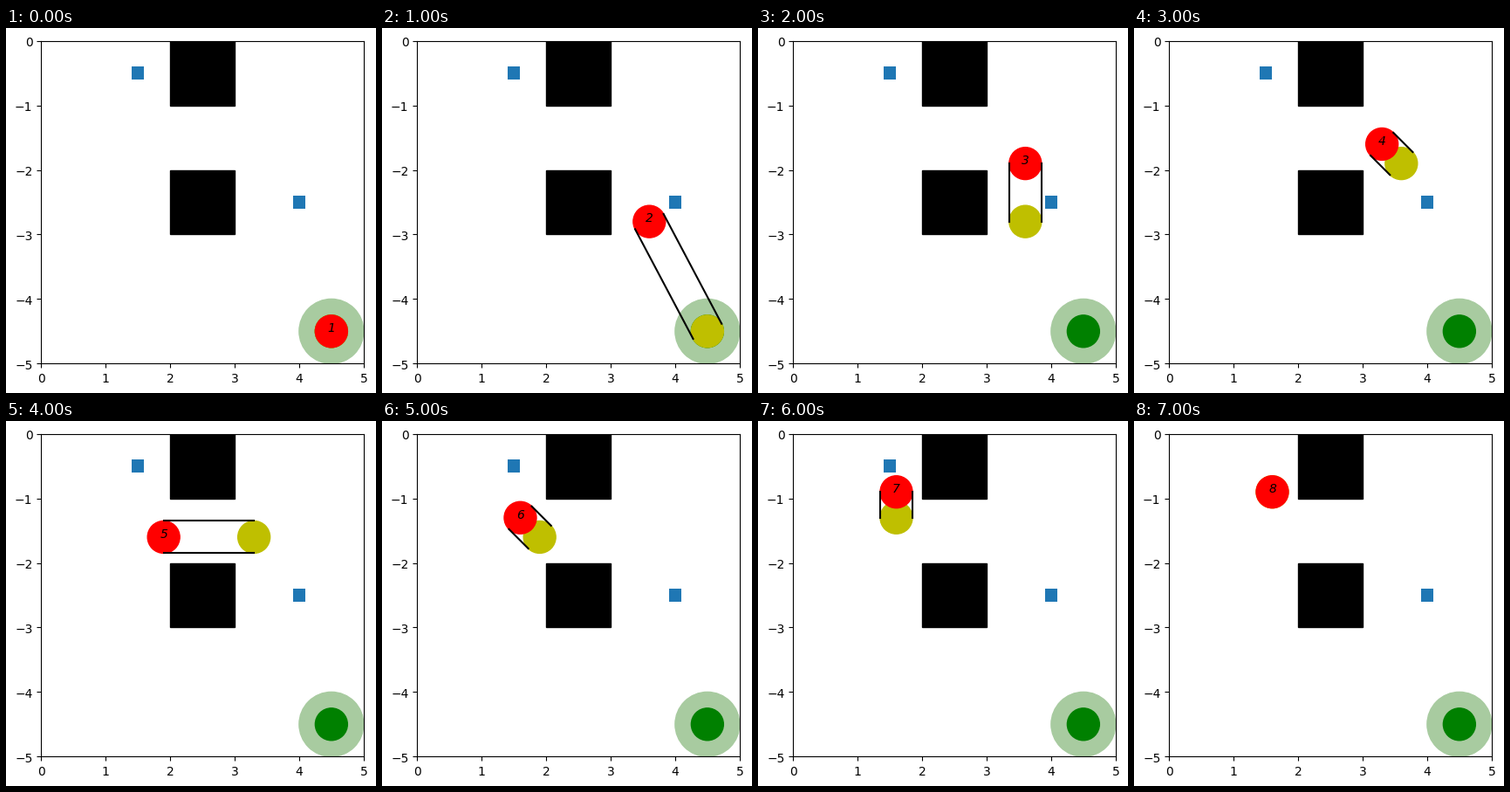
These frames come from a looping animation (424x418 px, 8 s). A matplotlib script:

```python
import numpy as np
import matplotlib.pyplot as plt
from matplotlib.animation import FuncAnimation
from matplotlib.patches import Circle, Rectangle
from matplotlib.transforms import ScaledTranslation

W, H, DPI = 424, 418, 100
LEFT, TOP, SIDE = 40.22, 14.68, 369.6  # plot area in pixels
TEXT_DROP = 0.8  # all text sits this many pixels lower than its anchor
R = 0.25
HOME = (4.5, -4.5)
PICKUP_STEP = 7

# Robot position at each step; the robot waits at its last place to pick up.
STOPS = np.array([HOME, (3.6, -2.8), (3.6, -1.9), (3.3, -1.6),
                  (1.9, -1.6), (1.6, -1.3), (1.6, -0.9), (1.6, -0.9)])

fig = plt.figure(figsize=(W / DPI, H / DPI), dpi=DPI, facecolor="white")
ax = fig.add_axes([LEFT / W, 1 - (TOP + SIDE) / H, SIDE / W, SIDE / H])
ax.set(xlim=(0, 5), ylim=(-5, 0), xticks=range(6), yticks=range(-5, 1))


def disc(center, radius, color):
    return ax.add_patch(Circle(center, radius, color=color))


def box(x, y, size, color, lw):
    return ax.add_patch(Rectangle((x, y), size, size, color=color, lw=lw))


box(2, -1, 1, "black", 1)
box(2, -3, 1, "black", 1)
item = box(1.4, -0.6, 0.2, "tab:blue", 0)
box(3.9, -2.6, 0.2, "tab:blue", 0)
disc(HOME, 0.5, "#a8cba0")
disc(HOME, R, "g")
previous = disc(HOME, R, "y")
robot = disc(HOME, R, "red")
rails = [ax.plot([], [], color="black", lw=1.5)[0] for _ in range(2)]
label = ax.text(*HOME, "", style="italic", ha="center", fontsize=10)

drop = ScaledTranslation(0, -TEXT_DROP / DPI, fig.dpi_scale_trans)
for text in [label, *ax.get_xticklabels(), *ax.get_yticklabels()]:
    text.set_transform(text.get_transform() + drop)


def update(step):
    start, end = STOPS[max(step - 1, 0)], STOPS[step]
    previous.center = start
    robot.center = end
    label.set_position(end)
    label.set_text(str(step + 1))
    item.set_visible(step < PICKUP_STEP)

    dx, dy = end - start
    length = np.hypot(dx, dy)
    for rail, side in zip(rails, (1, -1)):
        rail.set_visible(length > 0)
        if length > 0:
            offset = side * R * np.array([-dy, dx]) / length
            rail.set_data(*np.transpose([start + offset, end + offset]))
    return [previous, robot, label, item, *rails]


anim = FuncAnimation(fig, update, frames=len(STOPS), interval=1000,
                     repeat=True, repeat_delay=0)
plt.show()
```
